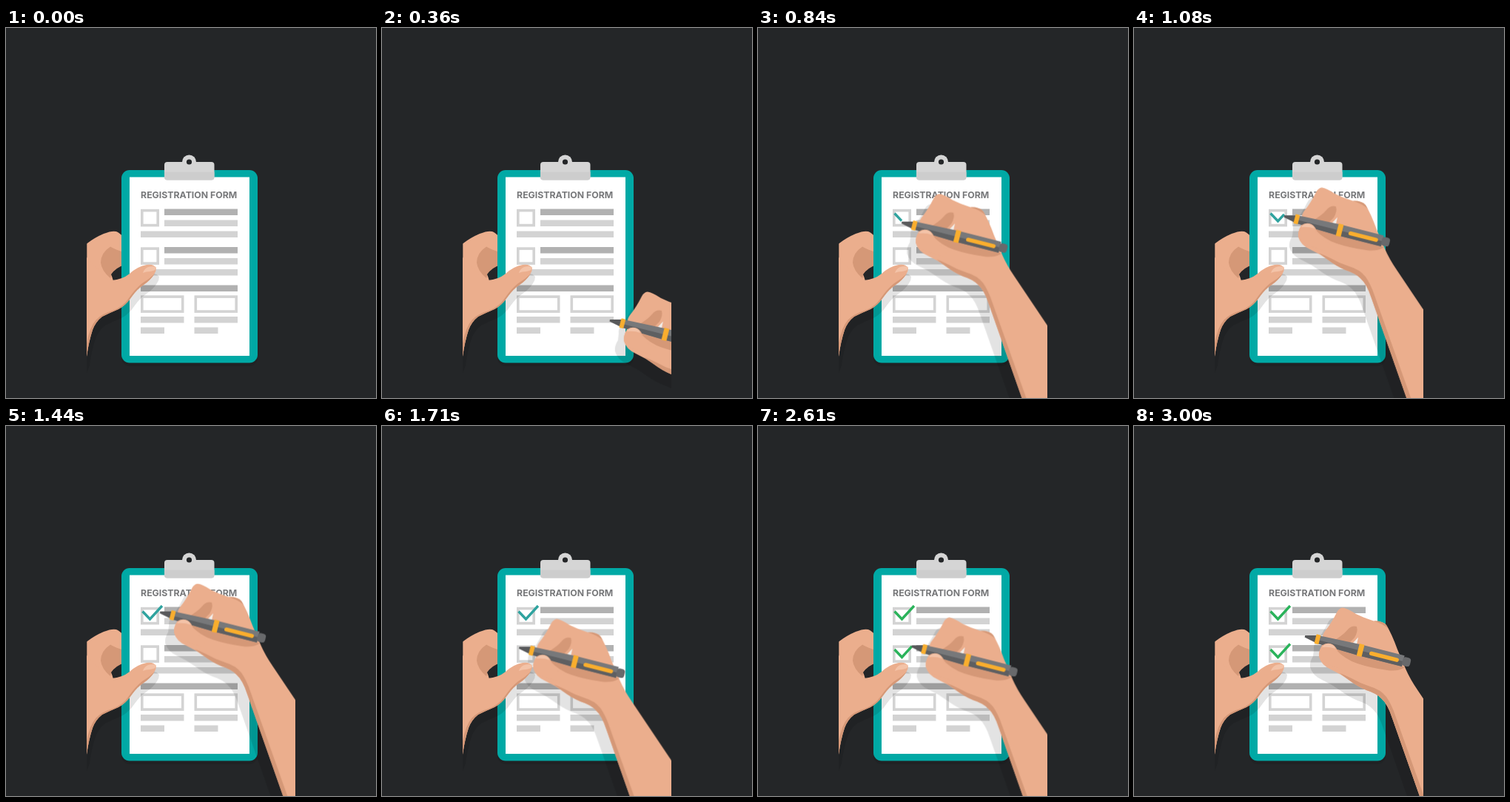
Animation of 500x500 px, one loop 3480 ms. Source, as an HTML page:

```html
<!DOCTYPE html>
<html lang="en">
<head>
<meta charset="utf-8">
<title>Registration form</title>
<style>
  html, body { margin: 0; width: 100%; height: 100%; overflow: hidden; background: #242628; }
  svg { display: block; width: 100%; height: 100%; }

  .skin { fill: #ebae8d; }
  .shade { fill: #d59877; }
  .nail { fill: #f3c3a8; }
  .shadow { fill: #000; opacity: .11; }
  .light { fill: #d3d3d3; }
  .dark { fill: #b1b1b1; }
  .box { fill: #fff; stroke: #d3d3d3; stroke-width: 3.6; }
  .title { font: 700 12.3px Inter, "Open Sans", sans-serif; fill: #77787a; text-anchor: middle; }

  .check {
    fill: none; stroke: #2fa39f; stroke-width: 3.4; stroke-dasharray: 101 300;
    animation: 3480ms linear infinite;
  }
  .first { animation-name: tick1, tint; }
  .second { animation-name: tick2, tint; }
  .writer { animation: write 3480ms infinite; }

  @keyframes tint {
    0% { stroke: #2fa39f; animation-timing-function: step-end; }
    69%, 100% { stroke: #2bb35b; }
  }
  @keyframes tick1 {
    0% { stroke-dashoffset: 101; }
    18.966% { stroke-dashoffset: 101; animation-timing-function: cubic-bezier(.45, 0, .55, 1); }
    25% { stroke-dashoffset: 64; animation-timing-function: cubic-bezier(.45, 0, .55, 1); }
    37.069%, 100% { stroke-dashoffset: 0; }
  }
  @keyframes tick2 {
    0% { stroke-dashoffset: 101; }
    51.724% { stroke-dashoffset: 101; animation-timing-function: cubic-bezier(.45, 0, .55, 1); }
    65.517% { stroke-dashoffset: 64; animation-timing-function: cubic-bezier(.45, 0, .55, 1); }
    79.31%, 100% { stroke-dashoffset: 0; }
  }
  /* Offsets of the pen tip from its drawn place */
  @keyframes write {
    0% { transform: translate(212px, 250px); }
    2.586% { transform: translate(212px, 250px); animation-timing-function: cubic-bezier(.65, 0, .35, 1); }
    18.966% { transform: translate(-4.5px, -1px); animation-timing-function: cubic-bezier(.45, 0, .55, 1); }
    25% { transform: translate(5.5px, 10px); animation-timing-function: cubic-bezier(.45, 0, .55, 1); }
    37.069% { transform: translate(22px, -7.5px); animation-timing-function: cubic-bezier(.65, 0, .35, 1); }
    51.724% { transform: translate(-4.5px, 48px); animation-timing-function: cubic-bezier(.45, 0, .55, 1); }
    65.517% { transform: translate(4px, 58.5px); animation-timing-function: cubic-bezier(.45, 0, .55, 1); }
    79.31% { transform: translate(22px, 41px); animation-timing-function: cubic-bezier(.45, 0, .55, 1); }
    86.207%, 100% { transform: translate(42px, 31px); }
  }
</style>
</head>
<body>
<svg viewBox="0 0 500 500">
  <defs>
    <clipPath id="stage"><rect x="109.300" y="160" width="281.300" height="340"/></clipPath>
    <path id="thumbArm" d="M100 300L128 330Q134 340 143 341Q157 340 167 332Q178 322 190 320Q199 318.500 203 324Q203 329 200 333Q195 341 186 347Q177 353 170 363Q162 375 152 380Q140 385 130 390Q121 397 117 408Q112 423 109 444L100 470Z"/>
    <path id="hand" d="M240 214.500Q246 215 258 223Q270 229 282 232.500Q294 232 299 238Q306 249 314 271L325 297Q331 311 342 327L391 400L480 532L366 532L307 364Q301 345 292 337Q285 330 272 326Q260 321 248 312Q237 304 224 298Q211 292 208 281Q207 274 212 266L213 257Q212 251 217 245Q225 235 232 221Q235 215 240 214.500Z"/>
    <g id="field">
      <rect class="box" x="183.800" y="363.100" width="54.900" height="20"/>
      <rect class="light" x="182" y="390" width="58.500" height="8.500"/>
      <rect class="light" x="182" y="404.500" width="32" height="8.500"/>
    </g>
    <g id="lines">
      <rect class="box" x="183.800" y="246.600" width="21.400" height="20"/>
      <rect class="dark" x="214" y="244.500" width="99" height="8.500"/>
      <rect class="light" x="214" y="259.500" width="99" height="8.500"/>
      <rect class="light" x="182" y="274.500" width="131" height="8.500"/>
    </g>
  </defs>

  <g clip-path="url(#stage)">
    <!-- Fingers behind the board -->
    <path class="skin" d="M109 291.500Q120 283 132 278Q143 273.500 149 275Q154 277 160 284V310L142 332L146 345H109Z"/>
    <path class="shade" d="M160 303Q149 300 141 295.500Q128 304 128 317Q129 328 141 338L144 331L160 320Z"/>
    <path d="M160 320Q148 324 142 333Q144 339 151 338L160 336Z" fill="#242628"/>

    <!-- Board and paper -->
    <rect class="shadow" x="156" y="197" width="184" height="260" rx="11"/>
    <rect x="156" y="192" width="184" height="260.500" rx="11" fill="#00a9a5"/>
    <rect x="167" y="201.500" width="162" height="241.500" fill="#fff"/>
    <rect x="214" y="181" width="67.500" height="24.500" rx="4" fill="#d5d5d5"/>
    <path d="M214 194.500H281.500V201.500Q281.500 205.500 277.500 205.500H218Q214 205.500 214 201.500Z" fill="#cdcdcd"/>
    <circle cx="247.500" cy="181" r="9.500" fill="#d5d5d5"/>
    <circle cx="247.500" cy="181" r="3.600" fill="#242628"/>

    <text class="title" x="247.200" y="230.400">REGISTRATION FORM</text>
    <use href="#lines"/>
    <use href="#lines" y="51.500"/>
    <rect class="dark" x="182" y="347.500" width="131" height="8.500"/>
    <use href="#field"/>
    <use href="#field" x="72.500"/>

    <path class="check first" pathLength="100" d="M184.500 250.500L194.500 261L211 243"/>
    <path class="check second" pathLength="100" d="M184.500 302L194.500 312.500L211 294.500"/>

    <use class="shadow" href="#thumbArm" x="4" y="12"/>
    <g class="writer"><use class="shadow" href="#hand" x="-12" y="14"/></g>

    <!-- Holding hand -->
    <use class="skin" href="#thumbArm"/>
    <path class="shade" d="M201 332Q195 341 186 347Q177 353 170 363Q162 375 152 380Q140 385 130 390Q121 397 117 408Q112 423 109 444V426Q113 404 122 394Q130 386 144 382Q158 377 166 365Q175 352 184 345Q194 339 201 332Z"/>
    <path class="nail" d="M185 331Q187 324 194 322.500Q202 321 203 324.500Q202 328 195 329Q189 329 185 331Z"/>

    <!-- Writing hand -->
    <g class="writer">
      <use class="skin" href="#hand"/>
      <path class="shade" d="M228 259Q240 252 246 245Q252 238 259 240Q261 247 256 255L245 266Z"/>
      <path d="M254 262L261 254.500L259 264Z" fill="#f2efec"/>
      <path class="shade" d="M282 232.500Q294 232 299 238L302 243Q294 236 282 232.500Z"/>
      <path class="shade" d="M230 270L324 295Q315 301 300 299Q278 296 260 290Q242 284 230 270Z"/>
      <path class="shade" d="M236 303Q244 306 252 310Q264 317 277 321Q291 325 299 335Q306 345 311 360L372 532H366L307 364Q301 345 292 337Q285 330 272 326Q260 321 248 312Z"/>

      <!-- Pen, drawn along its axis from the tip -->
      <g transform="translate(189 253) rotate(14.200)">
        <path d="M0 -1L16 -5V5L0 1.500Z" fill="#58595b"/>
        <path d="M20 -5.500L76 -7.500H137V7.500H76L20 5.500Z" fill="#77787a"/>
        <path d="M20 .5H137V7.500H76L20 5.500Z" fill="#5e5f61"/>
        <rect x="136" y="-6" width="11" height="12" rx="4" fill="#68696b"/>
        <rect x="14.500" y="-6.500" width="6" height="13" rx="1" fill="#f9ae2e"/>
        <rect x="74" y="-8.500" width="7" height="17" rx="1" fill="#f9ae2e"/>
        <rect x="90" y="-2" width="41" height="5.400" rx="2.700" fill="#f9ae2e"/>
      </g>

      <path class="skin" d="M208 279Q208.500 270 213 265Q219 261 226 264Q233 268 233 276Q238 284 252 290L244 300L218 291Z"/>
      <path class="nail" d="M212 268Q216 262.500 223 263.500Q229 265 230 270Q223 267 212 268Z"/>
    </g>
  </g>
</svg>
</body>
</html>
```
